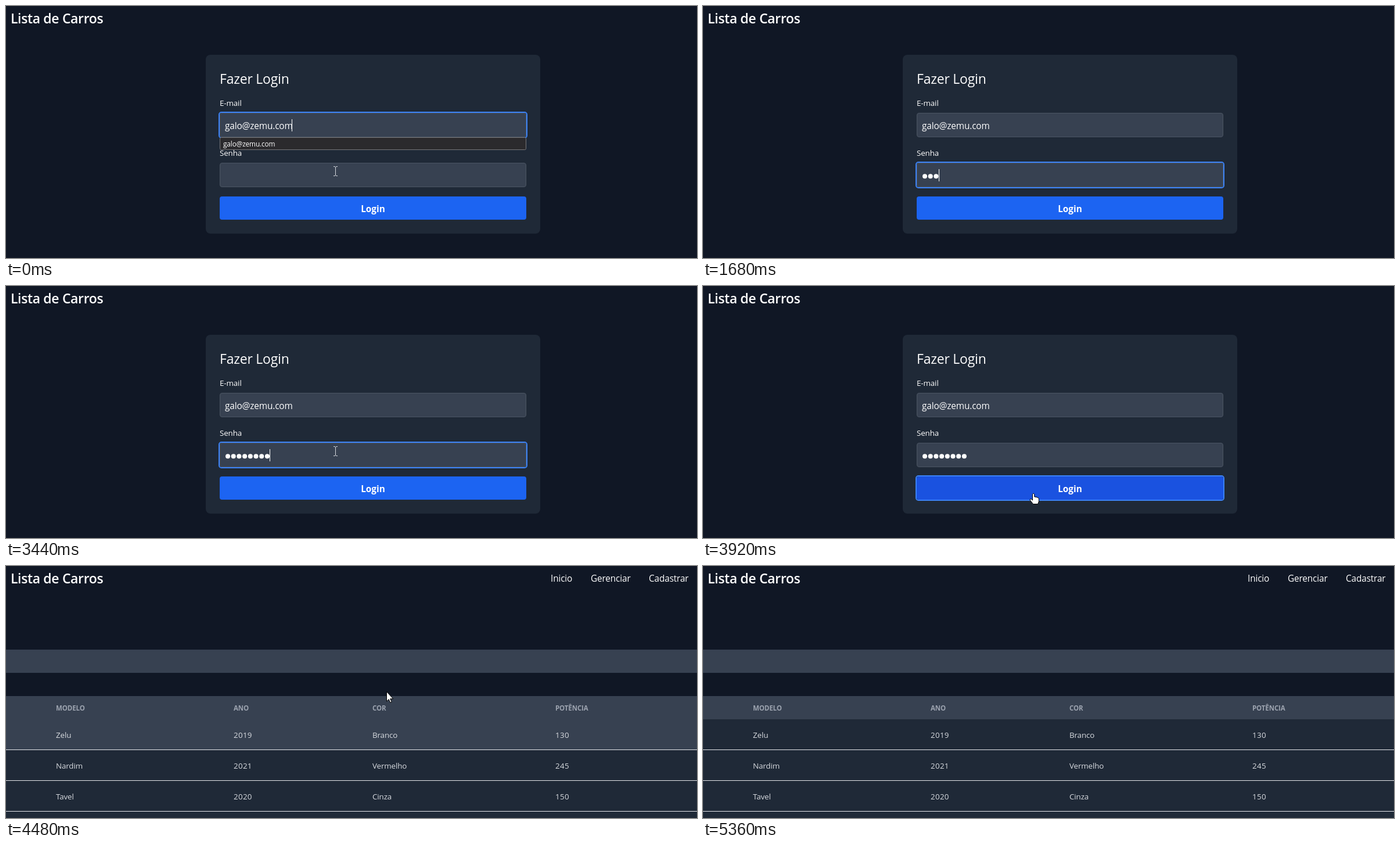
Write an HTML page that moves like this. It is 1190 px wide and 434 px high and loops after 5.44 s.

```html
<!DOCTYPE html>
<html lang="pt">
<head>
<meta charset="utf-8">
<title>Lista de Carros</title>
<style>
  html, body { margin: 0; width: 100%; height: 100%; overflow: hidden; background: #101725; }
  svg { display: block; width: 1190px; height: 434px; }
  text { font-family: "Open Sans", "Noto Sans", sans-serif; font-size: 15.4px; letter-spacing: -.01em; fill: #fff; }
  .title { font-size: 23px; font-weight: 600; letter-spacing: -.015em; }
  .heading { font-size: 23px; }
  .label { font-size: 13.4px; }
  .hint { font-size: 11.8px; }
  .button { font-weight: 700; text-anchor: middle; letter-spacing: 0; }
  .th { font-size: 11.5px; font-weight: 700; fill: #9ca3af; }
  .td { font-size: 13.4px; fill: #d8dbe0; }
  .num { letter-spacing: .3px; }
  .field { fill: #374151; stroke: #4b5563; }
  .ring { fill: none; stroke: #3b82f6; stroke-width: 2; }
  .caret { fill: #fff; }
  .pointer { fill: #fff; stroke: #000; stroke-linejoin: round; }
</style>
</head>
<body>
<svg viewBox="0 0 1190 434">
  <text class="title" x="8" y="30">Lista de Carros</text>

  <g id="login">
    <rect x="344" y="84" width="576" height="308" rx="8" fill="#1f2937"/>
    <text class="heading" x="368" y="134">Fazer Login</text>
    <text class="label" x="368" y="172">E-mail</text>
    <rect class="field" x="368.5" y="184.5" width="527" height="41" rx="3.5"/>
    <text x="377" y="212">galo@zemu.com</text>
    <text class="label" x="368" y="258">Senha</text>
    <rect class="field" x="368.5" y="270.5" width="527" height="41" rx="3.5"/>
    <g id="dots" fill="#fff"></g>
    <rect id="button" x="368" y="328" width="528" height="40" rx="4"/>
    <text class="button" x="632" y="355">Login</text>

    <g id="emailFocus">
      <rect class="ring" x="367" y="183" width="530" height="44" rx="4"/>
      <rect class="caret" x="492" y="195" width="1" height="21"/>
      <rect x="368.5" y="226.5" width="527" height="21" rx="2" fill="#2b2a2d" stroke="#77777a"/>
      <text class="hint" x="374" y="242">galo@zemu.com</text>
    </g>
    <g id="passFocus">
      <rect class="ring" x="367" y="269" width="530" height="44" rx="4"/>
      <rect id="passCaret" class="caret" y="281" width="1" height="21"/>
    </g>
    <rect id="buttonFocus" class="ring" x="367" y="327" width="530" height="42" rx="4"/>
  </g>

  <g id="list">
    <text x="938" y="27">Inicio</text>
    <text x="1007" y="27">Gerenciar</text>
    <text x="1107" y="27">Cadastrar</text>
    <path d="M0 144H1190V184H0ZM0 224H1190V264H0Z" fill="#374151"/>
    <g id="table"></g>
  </g>

  <g id="cursor">
    <path id="beam" d="M-3.5 -7.5H-1.5L0 -6.5L1.5 -7.5H3.5M0 -6.5V7.5M-3.5 8.5H-1.5L0 7.5L1.5 8.5H3.5" transform="translate(.5 0)" fill="none" stroke="#d5d9de"/>
    <path id="arrow" class="pointer" d="M.5 -.5V16L4.2 12.6L6.8 18.3L9.2 17.2L6.7 11.7H11.8Z"/>
    <path id="hand" class="pointer" d="M-.5 1.5Q1 -1 2.7 1.5V6L5 6.4L7.3 7L9 7.6Q10.4 8 10.4 10V14L8.6 18.5H.6L-4.6 12Q-5.4 9.4 -3 9.7L-.5 12Z"/>
  </g>
</svg>
<script>
const LOOP = 5440, STEP = 80;
const CLICK = 240, KEY = 320, FIRST_KEY = 960, DOTS = 8, PITCH = 9.7;
const LEAVE = 3440, SUBMIT = 3840, OPEN = 4000;

const el = id => document.getElementById(id);
const show = (id, on) => el(id).style.display = on ? "" : "none";

const columns = [86, 392, 631, 946];
const cells = (row, y, cls) => row.map((s, i) =>
  `<text class="${cls}${/^\d/.test(s) ? " num" : ""}" x="${columns[i]}" y="${y}">${s}</text>`).join("");

const rows = [
  ["Zelu", "2019", "Branco", "130"],
  ["Nardim", "2021", "Vermelho", "245"],
  ["Tavel", "2020", "Cinza", "150"],
  []
];
el("table").innerHTML = cells(["MODELO", "ANO", "COR", "POTÊNCIA"], 249, "th") +
  rows.map((row, i) => {
    const y = 264 + 53 * i;
    return `<rect id="row${i}" y="${y}" width="1190" height="52"/>` +
      `<rect y="${y + 52}" width="1190" height="1" fill="#e5e7eb"/>` + cells(row, y + 32, "td");
  }).join("");

el("dots").innerHTML = Array.from({ length: DOTS }, (_, i) =>
  `<circle id="dot${i}" cx="${382 + PITCH * i}" cy="293.3" r="4"/>`).join("");

// time, x, y
const path = [
  [0, 567, 284], [LEAVE, 567, 284], [3680, 568, 357],
  [4240, 568, 357], [4480, 655, 217], [4720, 742, -30], [LOOP, 742, -30]
];
function cursorAt(t) {
  const i = path.findIndex(p => p[0] > t);
  const [t0, x0, y0] = path[i - 1], [t1, x1, y1] = path[i];
  const k = (t - t0) / (t1 - t0);
  return [x0 + (x1 - x0) * k, y0 + (y1 - y0) * k];
}

function draw(t) {
  const inList = t >= OPEN;
  const [x, y] = cursorAt(t);
  show("login", !inList);
  show("list", inList);

  // Password typing
  const typed = t < FIRST_KEY ? 0 : Math.min(DOTS, 1 + Math.floor((t - FIRST_KEY) / KEY));
  const lastInput = typed ? FIRST_KEY + (typed - 1) * KEY : CLICK;
  for (let i = 0; i < DOTS; i++) show("dot" + i, i < typed);
  show("emailFocus", t < CLICK);
  show("passFocus", t >= CLICK && t < SUBMIT);
  show("passCaret", (t - lastInput) % 1000 < 500);
  el("passCaret").setAttribute("x", Math.floor(377 + PITCH * typed));

  const overButton = !inList && y >= 328;
  el("button").setAttribute("fill", overButton ? "#1a52e0" : "#1c64f2");
  show("buttonFocus", t >= SUBMIT);

  // Row highlight trails the cursor slightly
  const hovered = inList ? Math.floor((cursorAt(t - 100)[1] - 264) / 53) : -1;
  rows.forEach((_, i) => el("row" + i).setAttribute("fill", i === hovered ? "#374151" : "#1f2937"));

  show("cursor", t < FIRST_KEY || t >= LEAVE);
  el("cursor").setAttribute("transform", `translate(${Math.round(x)} ${Math.round(y)})`);
  const overField = !inList && y < 312;
  show("beam", overField);
  show("hand", overButton);
  show("arrow", !overField && !overButton);
}

const start = performance.now();
function frame() {
  const t = (performance.now() - start) % LOOP;
  draw(Math.floor(t / STEP) * STEP);
  requestAnimationFrame(frame);
}
frame();
</script>
</body>
</html>
```
